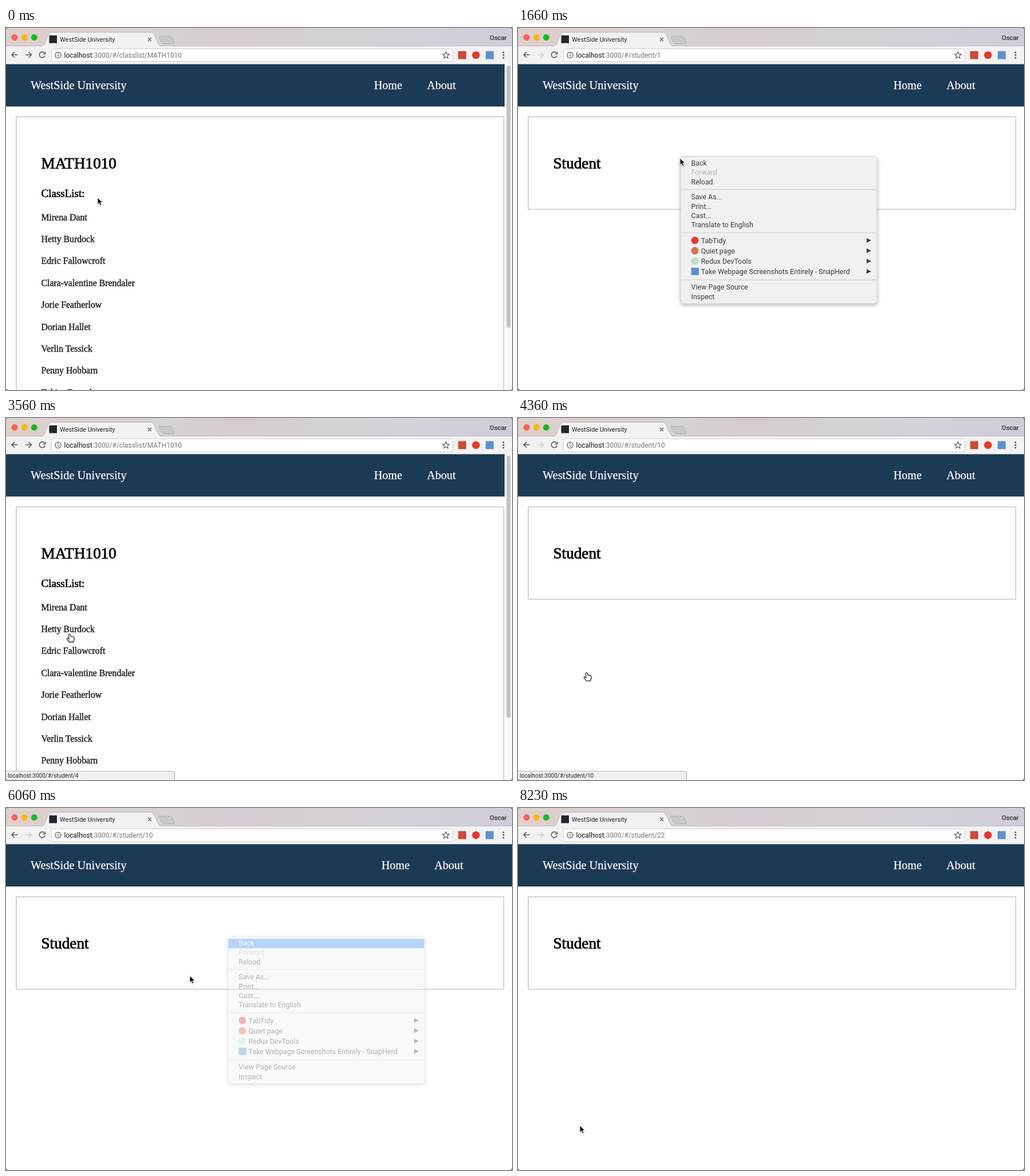
An HTML page for the animation above (9.1 s loop, 884 px wide and 634 px high).

```html
<!DOCTYPE html>
<html lang="en">
<head>
<meta charset="utf-8">
<title>Class list</title>
<style>
  html, body { margin: 0; width: 100%; height: 100%; overflow: hidden; background: #3b3f44; }
  svg { display: block; width: 884px; height: 634px; }
  text { white-space: pre; }
  .ui { font-family: Roboto, sans-serif; font-size: 12.4px; fill: #3c3c3e; }
  .page { font-family: "Liberation Serif", serif; }
  .nav { font-size: 20.1px; fill: #fff; stroke: #fff; stroke-width: .25; }
  .brand { font-size: 20.4px; }
  .title { font-size: 27.2px; stroke: #000; stroke-width: .75; }
  .sub { font-size: 19px; stroke: #000; stroke-width: .65; }
  .name { font-size: 15.8px; fill: #1c1c1c; stroke: #1c1c1c; stroke-width: .42; }
  .icon { fill: none; stroke: #5a5a5a; stroke-width: 1.6; }
</style>
</head>
<body>
<svg viewBox="0 0 884 634">
  <defs>
    <linearGradient id="bar">
      <stop offset="0" stop-color="#dfcfca"/>
      <stop offset=".3" stop-color="#d7d2d1"/>
      <stop offset=".44" stop-color="#d6ccd4"/>
      <stop offset=".6" stop-color="#d5d0d2"/>
      <stop offset=".8" stop-color="#d5d1da"/>
      <stop offset="1" stop-color="#cfcdd8"/>
    </linearGradient>
    <filter id="shadow" x="-10%" y="-10%" width="120%" height="120%">
      <feDropShadow dx="0" dy="2" stdDeviation="3" flood-opacity=".32"/>
    </filter>
    <filter id="soft" x="-50%" y="-50%" width="200%" height="200%">
      <feDropShadow dx="0" dy="1" stdDeviation="1" flood-opacity=".35"/>
    </filter>
    <clipPath id="frame"><rect width="884" height="634" rx="4"/></clipPath>
  </defs>
  <g clip-path="url(#frame)">
    <rect width="884" height="634" fill="#fdfefd"/>

    <g class="page">
      <rect id="header" y="63.200" height="74.300" fill="#1b3a54"/>
      <text class="nav brand" x="43" y="107">WestSide University</text>
      <g id="links" class="nav">
        <text x="656" y="107">Home</text>
        <text x="748.5" y="107">About</text>
      </g>
      <rect id="card" x="18" y="155.5" width="851.5" fill="none" stroke="#cdcdcd" stroke-width="1.7"/>
      <text id="title" class="title" x="61.5" y="246"></text>
      <text id="sub" class="sub" x="61.5" y="295.5">ClassList:</text>
      <g id="names"></g>
    </g>
    <g id="scroll">
      <rect x="871.3" y="63.5" width="12.7" height="571" fill="#fafafa"/>
      <rect x="874.5" y="66" width="7" height="459" rx="3.5" fill="#c1c1c1"/>
    </g>

    <g id="browser">
      <rect width="884" height="32" fill="url(#bar)"/>
      <rect y="31.5" width="884" height="31.7" fill="#f2f2f3"/>
      <path d="M0 31.5H62M268 31.5H884" stroke="#b9b6ba"/>
      <path d="M61 32C66 31 67 29 68 26L74 11Q75.5 7.5 80 7.5H253Q257 7.5 258.5 11L265 26Q267 31 271 32" fill="#f2f2f3" stroke="#aeabae" stroke-width=".8"/>
      <path d="M270 14.5H287Q289 14.5 290 17L294 25Q295 27.5 292 27.5H276Q273.5 27.5 272.5 25L267.5 16Q267 14.5 270 14.5Z" fill="#cbc8cb" stroke="#aaa7aa" stroke-width=".8"/>
      <g stroke-width=".5">
        <circle cx="15" cy="16.5" r="5.2" fill="#fc605b" stroke="#de4a44"/>
        <circle cx="32.3" cy="16.5" r="5.2" fill="#fdb70f" stroke="#dea022"/>
        <circle cx="49.3" cy="16.5" r="5.2" fill="#17b926" stroke="#12a31f"/>
      </g>
      <rect x="75.5" y="13" width="13.5" height="13.5" fill="#20262c"/>
      <path d="M248 17L254 23M254 17L248 23" stroke="#5c5c5c" stroke-width="1.2"/>
      <rect x="79.5" y="36.5" width="701" height="22" rx="3" fill="#fff" stroke="#d0d0d1"/>
      <g class="icon">
        <path d="M20.5 47H10M15 42L10 47L15 52"/>
        <path id="forward" d="M34 47H44.5M39.5 42L44.5 47L39.5 52"/>
        <path d="M67 43.5A5 5 0 1 0 68 48.5M68.5 41.5V45.5H64.5"/>
        <path d="M768.5 41.7L770.2 45.6L774.4 46L771.2 48.8L772.2 53L768.5 50.8L764.8 53L765.8 48.8L762.6 46L766.8 45.6Z" stroke-width="1.2"/>
        <circle cx="91" cy="47.5" r="5.2" stroke-width="1.2"/>
        <path d="M91 46.5V50.5M91 44V45.4" stroke-width="1.3"/>
      </g>
      <rect x="790" y="40.5" width="14" height="14" fill="#cf4839"/>
      <circle cx="821" cy="47.5" r="6.8" fill="#e5382f"/>
      <rect x="838" y="40.5" width="14" height="14" fill="#5b93c9"/>
      <g fill="#5a5a5a">
        <circle cx="869" cy="42.7" r="1.5"/><circle cx="869" cy="47.3" r="1.5"/><circle cx="869" cy="51.9" r="1.5"/>
      </g>
      <g class="ui">
        <text x="94" y="23.5" style="font-size:11px;fill:#222">WestSide University</text>
        <text x="875" y="21" text-anchor="end" style="font-size:11.5px;fill:#222;stroke:#222;stroke-width:.15">Oscar</text>
        <text x="101.5" y="51.8" style="font-size:12px;fill:#777"><tspan fill="#111">localhost</tspan><tspan id="path"></tspan></text>
      </g>
    </g>

    <g id="status">
      <path d="M-1 618.5H291.5Q294.5 618.5 294.5 621.5V635H-1Z" fill="#f1f1f1" stroke="#b5b5b5"/>
      <text id="statusText" class="ui" x="3" y="630" style="font-size:10px;fill:#222"></text>
    </g>
    <g id="menu"></g>
    <g id="cursor" filter="url(#soft)">
      <path id="arrow" d="M0 0V12L2.8 9.5L4.8 14L7 13L5 8.7H8.8Z" fill="#111" stroke="#fff" stroke-width=".9"/>
      <path id="hand" d="M-1.5 1Q0-.7 1.3 1L2 4.5Q3.5 3.6 4.3 4.9Q5.8 4.2 6.5 5.6Q8.3 5.4 8.2 7.5L7.4 11L6.5 14H-.5L-4.6 8.8Q-5 6.5-2.5 7.5L-.8 9Z" fill="#fff" stroke="#222" stroke-width="1.1"/>
    </g>
  </g>
</svg>
<script>
const LOOP = 9100, ROW_TOP = 331, ROW_STEP = 38.4;
const $ = id => document.getElementById(id);
const clamp = v => Math.max(0, Math.min(1, v));
const show = (id, on) => $(id).setAttribute('visibility', on ? 'visible' : 'hidden');

const students = [
  [1, 'Mirena Dant'], [4, 'Hetty Burdock'], [7, 'Edric Fallowcroft'],
  [10, 'Clara-valentine Brendaler'], [13, 'Jorie Featherlow'], [16, 'Dorian Hallet'],
  [22, 'Verlin Tessick'], [25, 'Penny Hobbarn'], [28, 'Tobias Fennel']
];

// [start, view, student id]
const views = [
  [0, 'list'], [880, 'student', 1], [2640, 'empty'], [3200, 'list'],
  [4180, 'student', 10], [6200, 'empty'], [6730, 'list'], [7530, 'student', 22]
];
const menus = [
  { x: 284, open: 1660, hover: 1880, click: 2260 },
  { x: 388, open: 5200, hover: 5380, click: 5830 }
];
const hovers = [[0, 1200], [3200, 4400], [6730, 7800]];
const statuses = [[290, 1300], [3380, 4500], [7080, 8000]];

// [time, x, y] of the pointer tip
const path = [
  [0, 160, 297], [30, 160, 297], [410, 112, 329], [1200, 112, 329], [1620, 283, 228],
  [1850, 283, 228], [1900, 287, 231], [2290, 287, 231], [2560, 166, 273], [2900, 108, 330],
  [3250, 102, 352], [3560, 111, 378], [4010, 120, 446], [4400, 120, 446], [4820, 387, 228],
  [5350, 387, 228], [5530, 391, 232], [5880, 391, 232], [6300, 170, 430], [6700, 62, 545],
  [6900, 62, 571], [7160, 108, 556], [LOOP, 108, 556]
];

function pointerAt(t) {
  const i = Math.max(0, path.findIndex(p => p[0] > t) - 1);
  const a = path[i], b = path[i + 1], span = b[0] - a[0], u = (t - a[0]) / span;
  const still = (p, q) => !p || !q || (p[1] === q[1] && p[2] === q[2]);
  const slope = (k, axis) => {
    const p = path[k - 1], c = path[k], n = path[k + 1];
    return still(p, c) || still(c, n) ? 0 : (n[axis] - p[axis]) / (n[0] - p[0]);
  };
  return [1, 2].map(axis => {
    const h = u * u * (3 - 2 * u);
    return a[axis] + (b[axis] - a[axis]) * h
      + span * (u * (1 - u) ** 2 * slope(i, axis) - u * u * (1 - u) * slope(i + 1, axis));
  });
}

const rowAt = y => Math.max(0, Math.min(students.length - 1, Math.round((y - ROW_TOP) / ROW_STEP)));

function overName(x, y) {
  const row = rowAt(y);
  return Math.abs(y - ROW_TOP - row * ROW_STEP) < 9.5 && x > 62.5 && x < 62 + students[row][1].length * 6.7;
}

function buildMenu() {
  const label = (y, text, x = 18.6, extra = '') => `<text x="${x}" y="${y}" ${extra}>${text}</text>`;
  const plain = [[273.5, 'Reload'], [300.3, 'Save As...'], [316.5, 'Print...'], [333, 'Cast...'],
    [349.3, 'Translate to English'], [458.3, 'View Page Source'], [474.5, 'Inspect']];
  const addons = [['TabTidy', '#e5382f'], ['Quiet page', '#dd7048'], ['Redux DevTools', '#bfe3c4'],
    ['Take Webpage Screenshots Entirely - SnapHerd', '#5b93c9']];
  $('menu').innerHTML = `
    <rect x=".3" y="225.3" width="342.7" height="257.5" rx="5" fill="#f1f1f3" stroke="#c9c9cb" stroke-width=".8" filter="url(#shadow)"/>
    <rect id="highlight" x=".5" y="229" width="342" height="16.5" fill="#3f8ef6"/>
    ${[282.7, 358.6, 441].map(y => `<rect x=".7" y="${y - 1}" width="342" height="2.2" fill="#dedee0"/>`).join('')}
    <g class="ui">
      ${label(241.2, 'Back', 18.6, 'id="back"')}
      ${label(257.4, 'Forward', 18.6, 'style="fill:#b4b4b6"')}
      ${plain.map(p => label(...p)).join('')}
      ${addons.map(([text, color], i) => {
        const y = 372 + i * 18.1;
        const mark = i === 3
          ? `<rect x="18.5" y="${y - 6.5}" width="13.5" height="13" fill="${color}"/>`
          : `<circle cx="25" cy="${y}" r="6.5" fill="${color}"/>`;
        return mark + label(y + 4.5, text, 35.7) + `<path d="M325 ${y - 4}L333 ${y}L325 ${y + 4}Z"/>`;
      }).join('')}
    </g>`;
}

function drawMenu(t) {
  const m = menus.find(m => t >= m.open && t < m.click + 320);
  show('menu', m);
  if (!m) return;
  const lit = t >= m.hover && !(t >= m.click && t < m.click + 60);
  $('menu').setAttribute('transform', `translate(${m.x})`);
  $('menu').setAttribute('opacity', 1 - clamp((t - m.click - 100) / 210));
  $('highlight').setAttribute('opacity', lit ? 1 : 0);
  $('back').style.fill = lit ? '#fff' : '';
}

function drawPage(t) {
  const [, view, id] = views.filter(v => v[0] <= t).pop();
  const full = view === 'list', student = view === 'student';
  $('header').setAttribute('width', full ? 871.3 : 884);
  $('links').setAttribute('transform', `translate(${full ? -13 : 0})`);
  $('card').setAttribute('height', full ? 600 : student ? 162 : 214);
  $('title').textContent = student ? 'Student' : 'MATH1010';
  $('path').textContent = ':3000/#/' + (student ? 'student/' + id : 'classlist/MATH1010');
  $('forward').style.stroke = student ? '#d0d0d1' : '';
  show('sub', !student);
  show('names', full);
  show('scroll', full);
}

function drawPointer(t) {
  const [x, y] = pointerAt(t);
  const hand = hovers.some(([from, to]) => t >= from && t < to) && overName(x, y);
  $('cursor').setAttribute('transform', `translate(${x.toFixed(2)} ${y.toFixed(2)})`);
  show('hand', hand);
  show('arrow', !hand);
}

function drawStatus(t) {
  const shown = statuses.find(([from, to]) => t >= from && t < to + 220);
  show('status', shown);
  if (!shown) return;
  const [from, to] = shown;
  const [, y] = pointerAt(Math.min(t, to - 100));
  $('status').setAttribute('opacity', Math.min(clamp((t - from) / 120), 1 - clamp((t - to) / 220)));
  $('statusText').textContent = 'localhost:3000/#/student/' + students[rowAt(y)][0];
}

$('names').innerHTML = students.map(([, name], i) =>
  `<text class="name" x="61.5" y="${ROW_TOP + 5.5 + i * ROW_STEP}">${name}</text>`).join('');
buildMenu();

const start = performance.now();
function frame() {
  const t = (performance.now() - start) % LOOP;
  drawPage(t);
  drawMenu(t);
  drawPointer(t);
  drawStatus(t);
  requestAnimationFrame(frame);
}
frame();
</script>
</body>
</html>
```
